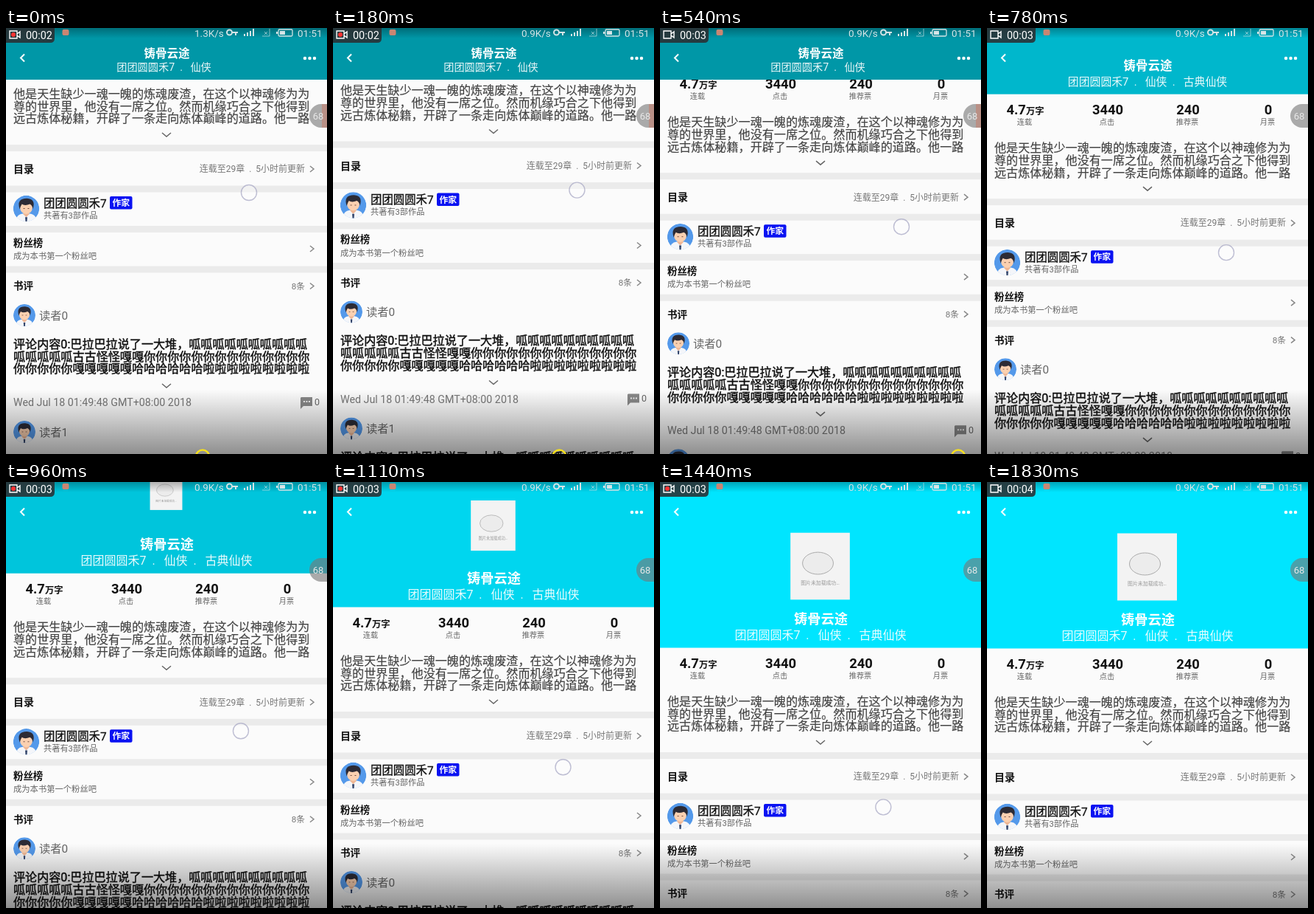
Recreate the animation shown at these times as an HTML page. Size 436 by 577 pixels, loop 1860 ms.

```html
<!DOCTYPE html>
<html lang="zh-CN">
<head>
<meta charset="utf-8">
<style>
html, body { margin: 0; width: 100%; height: 100%; overflow: hidden; background: #fbfbfb; }
svg { display: block; width: 436px; height: 577px; }
text { font-family: Roboto, "Noto Sans CJK SC", "Noto Sans CJK", sans-serif; white-space: pre; }
</style>
</head>
<body>
<svg id="stage" viewBox="0 0 436 577" fill="none"></svg>
<script>
const LOOP = 1860;
const TITLE = '铸骨云途', AUTHOR = '团团圆圆禾7', READER = '读者';
const GAP = '\u00a0\u00a0.\u00a0\u00a0\u00a0';

// Text placed by the vertical middle of its glyphs.
const MID = .36;
const text = (x, mid, size, str, fill = '#000', more = '') =>
  `<text x="${x}" y="${mid + size * MID}" font-size="${size}" fill="${fill}" ${more}>${str}</text>`;
const BOLD = 'font-weight="700"', MIDDLE = 'text-anchor="middle"', END = 'text-anchor="end"';
const heavy = (color, width) => `stroke="${color}" stroke-width="${width}"`;
const rect = (x, y, w, h, fill, r = 0) =>
  `<rect x="${x}" y="${y}" width="${w}" height="${h}" rx="${r}" fill="${fill}"/>`;
const line = (d, color, width = 1.5) => `<path d="${d}" stroke="${color}" stroke-width="${width}"/>`;
const more = y => line(`M212 ${y - 2}l6 5 6-5`, '#666');
const next = y => line(`M413 ${y - 4}l5 4-5 4`, '#888');

const avatar = (x, y, r) => `<g transform="translate(${x} ${y}) scale(${r / 18})" clip-path="url(#round)">
  <circle r="18" fill="#5499ea"/>
  <path d="M-14 18Q-14 8-5 7H5Q14 8 14 18Z" fill="#f4f6fa"/>
  <path d="M-4 4H4V8L0 12-4 8Z" fill="#efb795"/>
  <path d="M-1.5 12H1.5L1 18H-1Z" fill="#33456b"/>
  <ellipse cy="-1" rx="8.5" ry="8.5" fill="#fbd0b0"/>
  <path d="M-9 1Q-14-14 1-14 14-13 9 1 9-4 5-6-2-3-6-6-8-3-9 1Z" fill="#2c2b35"/>
  <path d="M-4 0h2M2 0h2" stroke="#6b4a40"/>
</g>`;

const lines = (y, rows, color, width) =>
  rows.map((row, i) => text(10, y + i * 16.8, 16.1, row, color, heavy(color, width))).join('');

const comment = (n, y) => avatar(25, y, 15) +
  text(45, y + .5, 15.3, READER + n, '#666') +
  lines(y + 39, [
    `评论内容${n}:巴拉巴拉说了一大堆，` + '呱'.repeat(10),
    '呱'.repeat(5) + '古古怪怪嘎嘎' + '你'.repeat(14),
    '你'.repeat(5) + '嘎'.repeat(5) + '哈'.repeat(6) + '啦'.repeat(9)
  ], '#111', .45) + more(y + 95) +
  text(10, y + 118, 14.25, 'Wed Jul 18 01:49:48 GMT+08:00 2018', '#777') +
  `<path d="M401 ${y + 111}h15v12h-12l-4 4v-15z" fill="#888"/>` +
  `<path d="M404 ${y + 117}h9" stroke="#eee" stroke-width="2" stroke-dasharray="2 1.5"/>` +
  text(419, y + 117, 12.5, '0', '#666');

const stats = [[51, '4.7<tspan font-size="12.3">万字</tspan>', '连载'], [163, '3440', '点击'],
  [272, '240', '推荐票'], [381, '0', '月票']];

// The page is laid out around the middle of the contents row.
const page = [-33, 22.5, 77, 131.5].map(y => rect(0, y, 436, 9, '#ebebeb')).join('') +
  stats.map(([x, value, label]) =>
    text(x + 1, -154, 18.4, value, '#111', `${BOLD} ${MIDDLE}`) +
    text(x, -137, 10.2, label, '#666', MIDDLE)).join('') +
  lines(-102, [
    '他是天生缺少一魂一魄的炼魂废渣，在这个以神魂修为为',
    '尊的世界里，他没有一席之位。然而机缘巧合之下他得到',
    '远古炼体秘籍，开辟了一条走向炼体巅峰的道路。他一路'
  ], '#444', .2) + more(-47) +
  text(10, 0, 14, '目录', '#111', BOLD) +
  text(406, 0, 12, '连载至29章  .  5小时前更新', '#777', END) + next(0) +
  avatar(27.5, 53.5, 17.7) +
  text(51, 46, 15.4, AUTHOR, '#111', heavy('#111', .3)) + rect(141, 37, 30.5, 17.5, '#0a12f2', 2) +
  text(156.2, 46, 11.8, '作家', '#fff', `${BOLD} ${MIDDLE}`) +
  text(51, 63, 11.2, '共著有3部作品', '#666') +
  text(10, 100, 13.4, '粉丝榜', '#111', BOLD) +
  text(10, 118, 11.3, '成为本书第一个粉丝吧', '#666') + next(108) +
  text(10, 158.5, 13.5, '书评', '#111', BOLD) +
  text(406, 158.5, 11.7, '8条', '#777', END) + next(158.5) +
  comment(0, 198) + comment(1, 356);

const cover = rect(-40.5, -45.5, 81, 91, '#f3f3f3') +
  '<ellipse cx="-3" cy="-4" rx="21" ry="15" fill="#ececec" stroke="#aaa"/>' +
  text(0, 22.5, 6.9, '图片未加载成功…', '#999', MIDDLE);

const LIGHT = '#d5e4e6';
const status = rect(0, 0, 436, 14, 'url(#top)') +
  text(256, 7, 13.5, '', LIGHT, 'id="speed"') + text(396, 7, 13.5, '01:51', LIGHT) +
  `<g stroke="${LIGHT}" stroke-width="2"><circle cx="303.5" cy="6" r="3.5"/>
   <path d="M307 6h8M312 6v4M324 11V8M328 11V6M332 11V4M336 11V1"/>
   <path d="M348 11h10V1M351 5l4 4M355 5l-4 4" stroke-width="1" opacity=".65"/>
   <rect x="370" y="2" width="19" height="9" rx="1.5" stroke-width="1.3"/><path d="M368 5v3"/></g>` +
  rect(372, 4, 7, 5, LIGHT) + rect(76.5, 2, 9, 8, '#c98673', 2) +
  '<path d="M0 0H66V14Q66 20 60 20H0Z" fill="#2b2f33" fill-opacity=".88"/>' +
  '<path d="M5 4h10v10H5ZM15 8l4-3v8l-4-3" stroke="#fff" stroke-width="1.4"/>' +
  '<circle id="dot" cx="10" cy="9" r="3" fill="#f33"/>' +
  text(27, 9.5, 14.4, '', '#fff', 'id="clock"');

stage.innerHTML = `<defs>
  <clipPath id="round"><circle r="18"/></clipPath>
  <linearGradient id="top" x2="0" y2="1"><stop stop-opacity=".28"/><stop offset="1" stop-opacity="0"/></linearGradient>
  <linearGradient id="shade" x2="0" y2="1"><stop stop-opacity="0"/><stop offset="1" stop-opacity=".43"/></linearGradient>
</defs>
${rect(0, 0, 436, 577, '#fbfbfb')}
<g id="scroll">${page}</g>
<rect id="bar" width="436"/>
<g id="cover">${cover}</g>
<text id="title" x="218.5" fill="#fff" ${BOLD} ${MIDDLE}>${TITLE}</text>
<text id="sub" fill="#fff" fill-opacity=".92" ${MIDDLE}></text>
<path d="M25 35.5l-5 5 5 5" stroke="#fff" stroke-width="2"/>
<path d="M406 41h.01M412.5 41h.01M419 41h.01" stroke="#fff" stroke-width="4.5" stroke-linecap="round"/>
${status}
${rect(0, 490, 436, 87, 'url(#shade)')}
<path d="M436 103H428A16 16 0 0 0 428 135H436Z" fill="#777" fill-opacity=".62"/>
<path id="tint" d="M429 103H436V135H429Z" fill="#d06a50" fill-opacity=".4"/>
${text(424, 119.5, 13, '68', '#e8e8e8', MIDDLE)}
<circle id="touch" r="10.5" fill="#fff" fill-opacity=".35" stroke="#a4a4c2" stroke-opacity=".7" stroke-width="1.4"/>
<circle id="cursor" r="9" stroke="#f6e01e" stroke-width="2.5"/>`;

const $ = id => document.getElementById(id);
const set = (id, attrs) => { for (const k in attrs) $(id).setAttribute(k, attrs[k]); };
const show = (id, on) => set(id, { visibility: on ? 'visible' : 'hidden' });
const clamp = v => Math.min(1, Math.max(0, v));

// Smooth curve through [time, value] points, at rest at both ends.
function curve(pts, t) {
  const last = pts.length - 1;
  if (t <= pts[0][0]) return pts[0][1];
  if (t >= pts[last][0]) return pts[last][1];
  const i = pts.findIndex(p => p[0] > t) - 1;
  const slope = j => j <= 0 || j >= last ? 0 :
    (pts[j + 1][1] - pts[j - 1][1]) / (pts[j + 1][0] - pts[j - 1][0]);
  const [t0, a] = pts[i], [t1, b] = pts[i + 1], d = t1 - t0, u = (t - t0) / d, v = 1 - u;
  return v * v * (1 + 2 * u) * a + u * u * (3 - 2 * u) * b +
    d * u * v * (v * slope(i) - u * slope(i + 1));
}

function blend(stops, x) {
  const i = Math.max(1, stops.findIndex(s => s[0] >= x));
  const [x0, ...a] = stops[i - 1], [x1, ...b] = stops[i], u = clamp((x - x0) / (x1 - x0));
  return `rgb(${a.map((c, k) => Math.round(c + (b[k] - c) * u))})`;
}

const scrollPts = [[30, 191], [360, 187], [540, 229], [780, 264], [960, 298], [1230, 379], [1350, 394], [1500, 400]];
const touchX = [[30, 330], [360, 333], [540, 328], [780, 325], [960, 319], [1230, 308], [1500, 303]];
const touchY = [[30, 223], [360, 223], [540, 269], [780, 304], [960, 337], [1230, 420], [1500, 441]];
const cursorX = [[0, 267], [360, 370], [540, 405], [700, 412]];
const CLOSED = 70;
const barColors = [[CLOSED, 0, 151, 167], [90, 0, 184, 205], [124, 0, 197, 220], [204, 0, 227, 254], [226, 0, 229, 255]];

function draw(now) {
  const t = now % LOOP;
  const y = curve(scrollPts, t), h = Math.max(CLOSED, y - 174.5), open = clamp((h - CLOSED) / 54);
  const closed = h === CLOSED;

  set('scroll', { transform: `translate(0 ${y})` });
  set('bar', { height: h, fill: blend(barColors, h) });
  set('cover', { transform: `translate(217.5 ${h - 110.5}) scale(${1 - (225.5 - h) * .0045})` });
  show('cover', h > 80);

  const size = 15.5 + 2.8 * open, subSize = 14.2 + 1.8 * open;
  set('title', { 'font-size': size, y: h - 35.5 - 3.5 * clamp((h - CLOSED) / 20) + size * MID });
  set('sub', { 'font-size': subSize, x: closed ? 214.5 : 218, y: h - 17.5 + subSize * MID });
  $('sub').textContent = [AUTHOR, '仙侠', '古典仙侠'].slice(0, closed ? 2 : 3).join(GAP);

  $('speed').textContent = t < 60 ? '1.3K/s' : '0.9K/s';
  $('clock').textContent = '00:0' + (2 + Math.floor((t + 550) / 1000));
  show('dot', (t + 550) % 1000 >= 450);
  show('tint', t < 660);

  set('touch', { cx: curve(touchX, t), cy: curve(touchY, t) });
  show('touch', t < 1560);

  const late = t >= 1710;
  set('cursor', { cx: late ? 276.5 : curve(cursorX, t), cy: late ? 529.5 : 580.5 + Math.max(0, t - 560) * .1 });
  show('cursor', t < 700 || late && t < 1830);
}

const start = performance.now();
function tick() {
  draw(performance.now() - start);
  requestAnimationFrame(tick);
}
tick();
</script>
</body>
</html>
```
